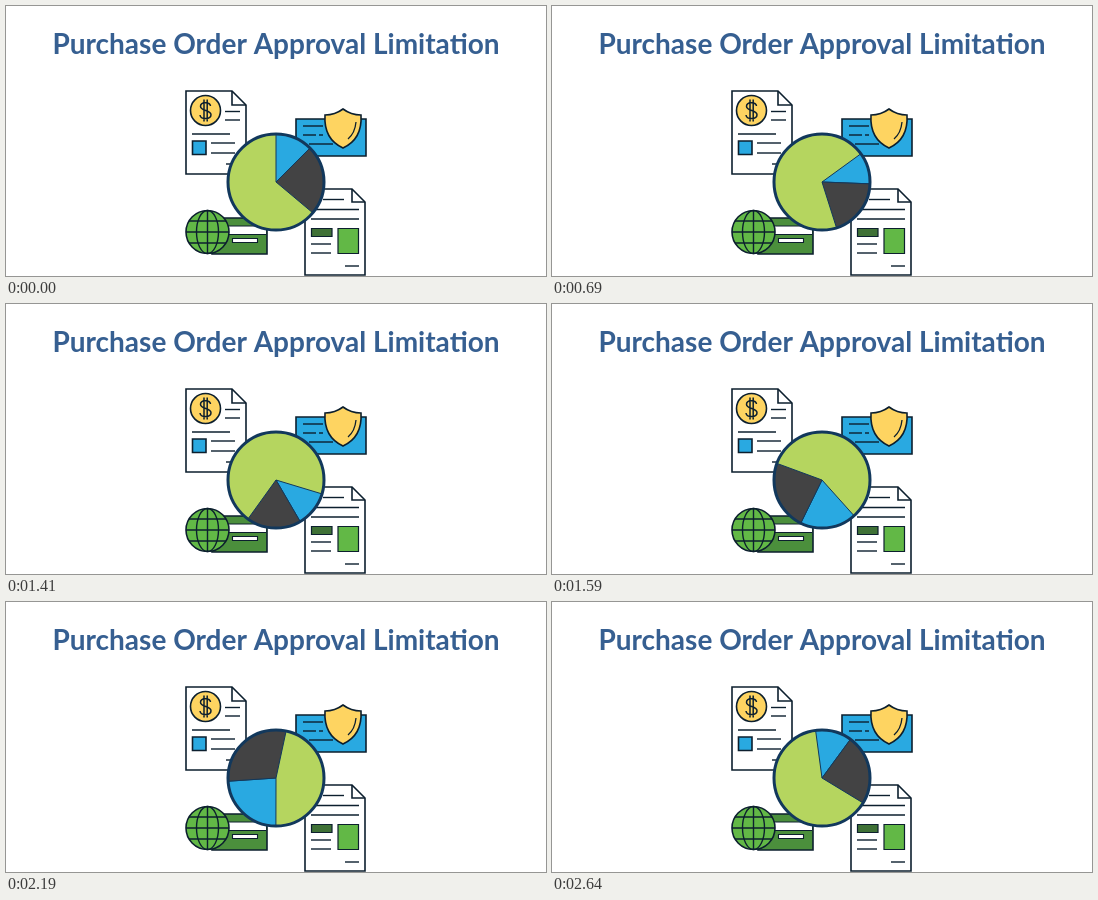
Recreate the animation shown at these times as an HTML page with a canvas. Size 540 px wide and 270 px high, loop 2.67 s.

```html
<!DOCTYPE html>
<html lang="en">
<head>
<meta charset="utf-8">
<title>Purchase Order Approval Limitation</title>
<style>
html, body { margin: 0; width: 100%; height: 100%; overflow: hidden; background: #fff; }
canvas { display: block; width: 540px; height: 270px; }
</style>
</head>
<body>
<canvas id="stage" width="540" height="270"></canvas>
<script>
const ctx = document.getElementById('stage').getContext('2d');
const LOOP = 2670;
const INK = '#0c1f2e', NAVY = '#12385c', BLUE = '#29a9e1', GREY = '#434344',
      LIME = '#b5d55f', GOLD = '#fed461', LEAF = '#62b846', MOSS = '#4b8f3c';

function paint(fill, stroke = INK, width = 1.6) {
  if (fill) { ctx.fillStyle = fill; ctx.fill(); }
  if (stroke) { ctx.strokeStyle = stroke; ctx.lineWidth = width; ctx.stroke(); }
}
function box(x, y, w, h, fill, stroke, width) {
  ctx.beginPath();
  ctx.rect(x, y, w, h);
  paint(fill, stroke, width);
}
function rule(x1, x2, y, width = 1.4) {
  ctx.beginPath();
  ctx.moveTo(x1, y);
  ctx.lineTo(x2, y);
  paint(null, INK, width);
}
function disc(x, y, r, fill, stroke, width) {
  ctx.beginPath();
  ctx.arc(x, y, r, 0, 2 * Math.PI);
  paint(fill, stroke, width);
}
function page(x, y, w, h, fold) {
  ctx.beginPath();
  ctx.moveTo(x, y);
  ctx.lineTo(x + w - fold, y);
  ctx.lineTo(x + w, y + fold);
  ctx.lineTo(x + w, y + h);
  ctx.lineTo(x, y + h);
  ctx.closePath();
  paint('#fff');
  ctx.beginPath();
  ctx.moveTo(x + w - fold, y);
  ctx.lineTo(x + w - fold, y + fold);
  ctx.lineTo(x + w, y + fold);
  paint(null);
}

function title() {
  ctx.fillStyle = '#365f91';
  ctx.font = 'bold 28px Lato, Carlito, sans-serif';
  ctx.textAlign = 'center';
  ctx.textBaseline = 'alphabetic';
  ctx.fillText('Purchase Order Approval Limitation', 270, 48);
}

function invoice() {
  page(180, 85, 60, 83, 14);
  disc(199.5, 104.5, 15, GOLD);
  ctx.beginPath();
  ctx.moveTo(204.5, 100);
  ctx.bezierCurveTo(204, 95.5, 194.5, 95.5, 194.5, 100.3);
  ctx.bezierCurveTo(194.5, 105.5, 205, 103.5, 205, 108.8);
  ctx.bezierCurveTo(205, 113.8, 194.5, 113.8, 194, 109);
  for (const x of [198, 201.2]) {
    ctx.moveTo(x, 93.5);
    ctx.lineTo(x, 115.5);
  }
  paint(null, INK, 1.5);
  rule(219, 234, 105.5);
  rule(219, 234, 114);
  rule(186, 224, 128);
  box(186.5, 135, 13.5, 13.5, BLUE);
  rule(205, 229, 137);
  rule(205, 229, 147);
  rule(220, 234, 158);
}

function policy() {
  box(290, 113, 70, 37, BLUE);
  rule(297, 317, 120);
  rule(297, 310, 129);
  rule(313, 317, 129);
  rule(303, 327, 138);
  ctx.beginPath();
  ctx.moveTo(337, 103);
  ctx.quadraticCurveTo(345, 109, 355, 109);
  ctx.bezierCurveTo(356, 125, 350, 136, 337, 142);
  ctx.bezierCurveTo(324, 136, 318, 125, 319, 109);
  ctx.quadraticCurveTo(329, 109, 337, 103);
  ctx.closePath();
  paint(GOLD);
  ctx.beginPath();
  ctx.moveTo(350, 116);
  ctx.quadraticCurveTo(349, 127, 342, 133);
  paint(null, INK, 1.3);
}

function report() {
  page(299, 183, 60, 86, 13);
  rule(317, 338, 193.5);
  rule(310, 353, 203.5);
  rule(305, 353, 213);
  box(305.5, 222.5, 20.5, 8, '#3f7136', INK, 1.2);
  box(332, 222.5, 20.5, 25, LEAF, INK, 1.2);
  rule(305, 325, 238);
  rule(305, 325, 247);
  rule(339, 353, 260);
}

function bankCard() {
  box(206, 212, 55, 36, MOSS);
  box(207, 220, 53, 8.5, '#fff', null);
  rule(207, 260, 220, 1);
  rule(207, 260, 228.5, 1);
  box(226.5, 232.5, 25, 4, '#fff', INK, 1.1);
  const x = 201.5, y = 226, r = 21.5;
  disc(x, y, r, LEAF);
  ctx.beginPath();
  ctx.ellipse(x, y, 11, r, 0, 0, 2 * Math.PI);
  ctx.moveTo(x, y - r);
  ctx.lineTo(x, y + r);
  for (const dy of [-11, 0, 11]) {
    const half = Math.sqrt(r * r - dy * dy);
    ctx.moveTo(x - half, y + dy);
    ctx.lineTo(x + half, y + dy);
  }
  paint(null, INK, 1.4);
}

// Edge angles in degrees clockwise from the top: blue start, blue end, grey end.
const HOME = [0, 45, 130], LOW = [95, 128, 187];
const TURN = [
  [1350, ...LOW],
  [1590, 138, 206, 290],
  [2190, 180, 266, 372],
  [2460, 262, 336, 436],
  [2640, 352, 396, 481],
  [2670, 360, 405, 490]
];

function ease(t, from, to) {
  const p = Math.min(1, Math.max(0, (t - from) / (to - from)));
  return p < 0.5 ? 2 * p * p : 1 - 2 * (1 - p) * (1 - p);
}
function slope(i, k) {
  const a = TURN[i], b = TURN[i + 1];
  return (b[k] - a[k]) / (b[0] - a[0]);
}
// Harmonic mean of neighbouring slopes keeps the curve free of overshoot.
function tangent(i, k) {
  if (i === 0) return slope(0, k);
  if (i === TURN.length - 1) return slope(i - 1, k);
  const a = slope(i - 1, k), b = slope(i, k);
  return 2 * a * b / (a + b);
}
function turn(t) {
  let i = 0;
  while (i < TURN.length - 2 && t >= TURN[i + 1][0]) i++;
  const a = TURN[i], b = TURN[i + 1], d = b[0] - a[0];
  const u = (t - a[0]) / d, v = 1 - u;
  return [1, 2, 3].map(k =>
    v * v * (1 + 2 * u) * a[k] + u * u * (3 - 2 * u) * b[k] +
    d * u * v * (v * tangent(i, k) - u * tangent(i + 1, k)));
}
function edges(t) {
  if (t >= TURN[0][0]) return turn(t);
  const spin = 360 * ease(t, 30, 360), p = ease(t, 450, 900);
  return HOME.map((a, k) => a + spin + (LOW[k] - a) * p);
}

function pie(t) {
  const x = 270, y = 176, r = 48;
  const rad = a => (a - 90) * Math.PI / 180;
  const [a, b, c] = edges(t);
  disc(x, y, r, LIME, null);
  for (const [from, to, fill] of [[a, b, BLUE], [b, c, GREY]]) {
    ctx.beginPath();
    ctx.moveTo(x, y);
    ctx.arc(x, y, r, rad(from), rad(to));
    ctx.closePath();
    paint(fill, NAVY, 1);
  }
  disc(x, y, r, null, NAVY, 3);
}

function draw(t) {
  ctx.fillStyle = '#fff';
  ctx.fillRect(0, 0, 540, 270);
  title();
  invoice();
  policy();
  report();
  bankCard();
  pie(t);
}

const start = performance.now();
function tick() {
  draw((performance.now() - start) % LOOP);
  requestAnimationFrame(tick);
}
tick();
</script>
</body>
</html>
```
